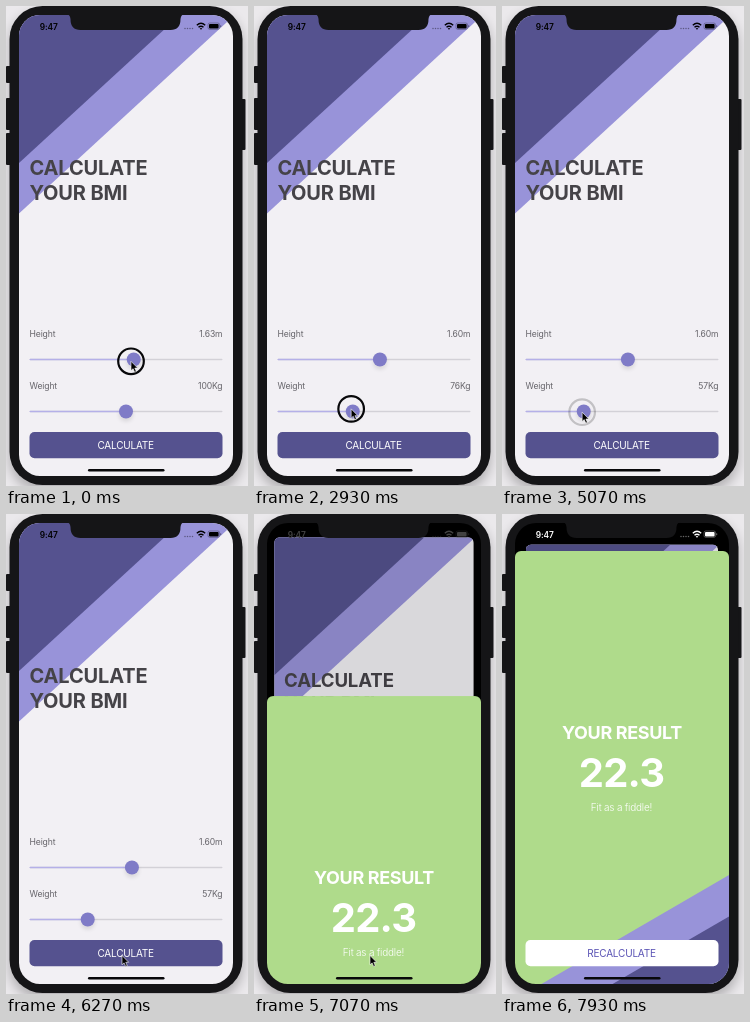
These frames come from a looping animation (242x480 px, 8 s). An HTML page:

```html
<!DOCTYPE html>
<html lang="en">
<head>
<meta charset="utf-8">
<title>BMI calculator</title>
<style>
  html, body { margin: 0; width: 100%; height: 100%; overflow: hidden; background: #ebe9ec; }
  svg { display: block; width: 242px; height: 480px; }
  text { font-family: Inter, "Open Sans", sans-serif; }
  .title { font-size: 20px; font-weight: 700; letter-spacing: -.008em; fill: #454348; }
  .label { font-size: 8.6px; letter-spacing: -.015em; fill: #66646a; }
  .end { text-anchor: end; }
  .mid { text-anchor: middle; fill: #fff; letter-spacing: -.02em; }
  .btn { font-size: 10px; }
  .track { fill: #d3d1d7; }
  .fill { fill: #b5b0e8; }
  .thumb { fill: #7f7bc7; }
  .dark { fill: #55528f; }
  .light { fill: #9893d9; }
  .body { fill: #151517; }
</style>
</head>
<body>
<svg viewBox="0 0 242 480">
  <defs>
    <clipPath id="screen"><rect x="13" y="9" width="214" height="461" rx="21"/></clipPath>
    <clipPath id="card"><rect x="13" y="9" width="214" height="461" rx="6"/></clipPath>
    <clipPath id="sheetClip"><rect x="13" y="37" width="214" height="460" rx="6"/></clipPath>
    <filter id="soft" x="-50%" y="-50%" width="200%" height="200%"><feGaussianBlur stdDeviation="2.2"/></filter>
    <filter id="wide" x="-20%" y="-20%" width="140%" height="140%"><feGaussianBlur stdDeviation="6"/></filter>
  </defs>

  <!-- phone body -->
  <rect x="3.5" y="6" width="233" height="479" rx="32" opacity=".25" filter="url(#wide)"/>
  <g class="body">
    <rect x="0" y="60" width="6" height="17" rx="1"/>
    <rect x="0" y="92" width="6" height="32" rx="1"/>
    <rect x="0" y="127" width="6" height="32" rx="1"/>
    <rect x="234" y="93" width="5.5" height="51" rx="1"/>
    <rect x="3.5" y="0" width="233" height="479" rx="33"/>
  </g>

  <g clip-path="url(#screen)">
    <rect width="242" height="480" fill="#000"/>

    <g id="form"><g clip-path="url(#card)">
      <rect x="13" y="9" width="214" height="461" fill="#f2f0f4"/>
      <path class="light" d="M13 9H228.5L13 207.5z"/>
      <path class="dark" d="M13 9H174L13 157z"/>
      <text class="title" x="23.5" y="169.4">CALCULATE</text>
      <text class="title" x="23.5" y="194">YOUR BMI</text>
      <g id="sliders"></g>
      <rect class="dark" x="23.5" y="426" width="193" height="26.3" rx="5"/>
      <text class="mid btn" x="119.7" y="443">CALCULATE</text>
      <rect id="dim" x="13" y="9" width="214" height="461"/>
    </g></g>

    <g id="sheet"><g clip-path="url(#sheetClip)">
      <rect x="13" y="37" width="214" height="460" fill="#afdb8b"/>
      <path class="light" d="M227 361V497H-7z"/>
      <path class="dark" d="M227 402.5V497H64z"/>
      <text class="mid" x="120" y="225" font-size="18" font-weight="700">YOUR RESULT</text>
      <text class="mid" x="119.5" y="273" font-size="40" font-weight="700">22.3</text>
      <text class="mid btn" x="119.5" y="297" font-weight="300">Fit as a fiddle!</text>
      <rect x="23.5" y="426" width="193" height="26.3" rx="5" fill="#fff"/>
      <text class="mid btn" x="119.5" y="443" style="fill:#5b54b5">RECALCULATE</text>
    </g></g>

    <g id="status" fill="currentColor">
      <text x="33.8" y="23.5" font-size="8.4" font-weight="600" letter-spacing="-.1">9:47</text>
      <path d="M179 22.5h10" stroke="currentColor" stroke-width="1.5" stroke-linecap="round" stroke-dasharray="0 2.5" opacity=".4"/>
      <path d="M190.8 19.2q4.2-3.7 8.4 0M192.5 21.2q2.5-2.1 5 0" fill="none" stroke="currentColor" stroke-width="1.4"/>
      <path d="M193.7 22.4q1.3-1 2.6 0L195 23.8z"/>
      <rect x="202" y="17" width="11.6" height="6.4" rx="1.8" fill="none" stroke="currentColor" stroke-width=".7" opacity=".4"/>
      <rect x="203" y="18" width="9.6" height="4.4" rx="1"/>
      <rect x="214.3" y="19.2" width=".9" height="2" rx=".4" opacity=".5"/>
    </g>
    <rect x="82" y="463" width="76.5" height="2.6" rx="1.3" fill="#08080a"/>
  </g>
  <path class="body" d="M59.5 8q4.5 0 5 5q0 11 10 11h90q10 0 10-11q.5-5 5-5z"/>

  <g id="pointer">
    <circle id="ring" r="12.8" fill="none" stroke="#08080a" stroke-width="2.2"/>
    <path d="M0 0V9.3L2.1 7.4L3.6 10.9L5.3 10.2L3.8 6.8H6.7z" stroke="#fff" stroke-width=".6"/>
  </g>
</svg>
<script>
const LOOP = 8000, STEP = 1000 / 15;
const $ = id => document.getElementById(id);
const mix = (a, b, u) => a + (b - a) * u;
const thumbX = part => 31 + 178 * part;

function slider(label, y) {
  const g = document.createElementNS("http://www.w3.org/2000/svg", "g");
  g.innerHTML = `
    <text class="label" x="23.5" y="${y - 22.3}">${label}</text>
    <text class="label end" x="216.5" y="${y - 22.3}"></text>
    <rect class="track" x="23.5" y="${y - .8}" width="193" height="1.6" rx=".8"/>
    <rect class="fill" x="23.5" y="${y - .8}" height="1.6" rx=".8"/>
    <circle cy="${y + 3}" r="7" opacity=".1" filter="url(#soft)"/>
    <circle class="thumb" cy="${y}" r="7"/>`;
  $("sliders").append(g);
  const value = g.querySelector(".end"), fill = g.querySelector(".fill");
  const dots = g.querySelectorAll("circle");
  return (part, text) => {
    const x = thumbX(part);
    value.textContent = text;
    fill.setAttribute("width", x - 23.5);
    dots.forEach(d => d.setAttribute("cx", x));
  };
}
const setHeight = slider("Height", 353.5);
const setWeight = slider("Weight", 405.5);

function draw(ms) {
  const t = Math.floor((ms + 4) / STEP) * STEP;
  const ramp = (from, to) => {
    const u = Math.min(1, Math.max(0, (t - from) / (to - from)));
    return u * u * (3 - 2 * u);
  };
  const press = (down, up) => ramp(down, down + 150) * (1 - ramp(up, up + 150));

  const metres = 1.63 - .03 * ramp(500, 670);
  const kilos = 100 - 30 * ramp(2600, 3070) - 15 * ramp(3270, 3730) + 2 * ramp(3870, 4330);
  setHeight(metres / 3, metres.toFixed(2) + "m");
  setWeight(kilos / 200, Math.round(kilos) + "Kg");

  // The pointer drags each thumb, taps the button, then speeds off to the right
  const toWeight = ramp(1420, 2130), toButton = ramp(5800, 6270);
  const away = Math.max(0, t - 7735);
  const dragX = mix(thumbX(metres / 3) - 2.7, thumbX(kilos / 200) - 1.6, toWeight);
  const dragY = mix(355.3, 402 + 4.2 * ramp(2600, 3730), toWeight);
  const x = mix(dragX, 116, toButton) + .25 * away + .0023 * away ** 2;
  const y = mix(dragY, 441.5, toButton) - .2 * away - .0008 * away ** 2;
  $("pointer").setAttribute("transform", `translate(${x} ${y})`);
  $("ring").setAttribute("opacity", press(-200, 960) + press(2230, 4960) + press(6700, 6840));

  // Critically damped spring brings up the sheet
  const w = Math.max(0, .021 * (t - 6958));
  const rest = (1 + w) * Math.exp(-w), p = 1 - rest;
  $("sheet").setAttribute("transform", `translate(0 ${433 * rest})`);
  $("form").setAttribute("transform",
    `translate(120 ${240 - 2 * p}) scale(${1 - .102 * p}) translate(-120 -240)`);
  $("dim").setAttribute("opacity", Math.min(.1, .18 * p));
  const c = Math.round(255 * ramp(7000, 7200));
  $("status").style.color = `rgb(${c},${c},${c})`;
}

const start = performance.now();
function tick() {
  draw((performance.now() - start) % LOOP);
  requestAnimationFrame(tick);
}
tick();
</script>
</body>
</html>
```
